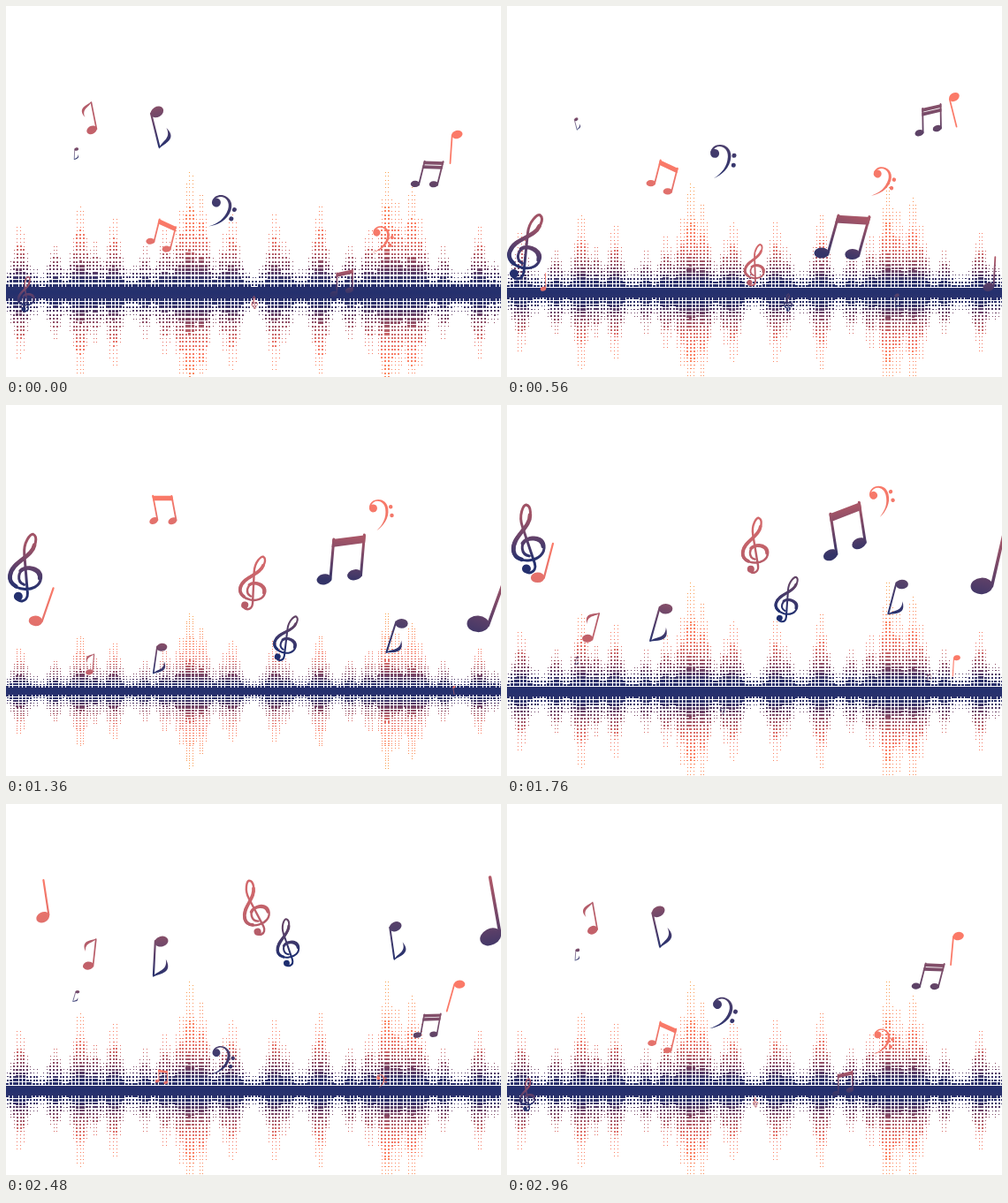
Write an HTML page with a canvas that moves like this. It is 560 by 420 pixels and loops after 3000 ms.

```html
<!DOCTYPE html>
<html lang="en">
<head>
<meta charset="utf-8">
<title>Music notes over a sound wave</title>
<style>
  html, body { margin: 0; width: 100%; height: 100%; overflow: hidden; background: #fff; }
  canvas { display: block; }
</style>
</head>
<body>
<canvas id="stage" width="560" height="420"></canvas>
<script>
const ctx = document.getElementById('stage').getContext('2d');
const LOOP = 3000, STEP = 40, MID = 324;
const NAVY = '#24306e', PLUM = '#704866', CORAL = '#fb7a68';

// ---- Sound wave: a dotted spectrum that pulses vertically ----
const PULSE = [1, 0.645, 0.9];
const COL = 3.75, ROW = 4.4;
const peaks = [
  [16, 76], [55, 56], [84, 99], [100, 60], [122, 86], [157, 52], [180, 71],
  [198, 92], [208, 138], [221, 112], [247, 66], [256, 89], [304, 91], [316, 58],
  [355, 99], [389, 55], [411, 71], [431, 138], [443, 102], [459, 119],
  [468, 85], [495, 54], [535, 74], [553, 36]
];

function random(seed) {
  const s = Math.sin(seed * 127.1 + 3.7) * 43758.5453;
  return s - Math.floor(s);
}

function columnHeight(x, i) {
  let h = 20 + 12 * random(i >> 1);
  for (const [px, ph] of peaks) {
    const d = Math.max(0, Math.abs(x - px) - 3);
    h = Math.max(h, ph * Math.exp(-d / 10));
  }
  return h;
}

const columns = Array.from({ length: 150 }, (_, i) => {
  const x = 1.5 + i * COL;
  return [x, columnHeight(x, i)];
});

const stops = [[0, NAVY], [14, '#2f336b'], [25, '#694267'], [38, '#a05668'],
  [54, '#e2726a'], [72, '#fb7f67'], [100, '#fb8d60'], [140, '#f8a74c']];

function waveFill(scale) {
  const reach = 140 * scale;
  const fill = ctx.createLinearGradient(0, MID - reach, 0, MID + reach);
  for (const [d, color] of stops) {
    fill.addColorStop(0.5 - d / 280, color);
    fill.addColorStop(0.5 + d / 280, color);
  }
  return fill;
}

// Dots sit on whole pixels and shrink toward the tip of their column.
function dot(x, y, w, h) {
  ctx.fillRect(Math.round(x - w / 2), Math.round(y - h / 2), w, h);
}

function drawWave(scale) {
  ctx.fillStyle = waveFill(scale);
  dot(280, MID, 560, Math.round(12.6 * scale));
  for (const [x, h] of columns) {
    for (let d = 8; d <= h; d += ROW) {
      const size = 0.7 + 2.8 * (1 - d / h);
      const w = Math.max(1, Math.round(size));
      const tall = Math.max(1, Math.round(size * scale));
      dot(x, MID - d * scale, w, tall);
      dot(x, MID + d * scale, w, tall);
    }
  }
}

// ---- Note shapes, drawn around their own centre ----
function blob(x, y, rx, ry = rx, turn = 0) {
  ctx.beginPath();
  ctx.ellipse(x, y, rx, ry, turn, 0, 7);
  ctx.fill();
}

function line(path, width) {
  ctx.lineWidth = width;
  ctx.stroke(new Path2D(path));
}

function fill(path) {
  ctx.fill(new Path2D(path));
}

function twin(rise, beams) {
  const left = -25 + rise / 2, right = -25 - rise / 2;
  line(`M-11 ${left}V${46 + left}M23 ${right}V${46 + right}`, 3);
  blob(-18, left + 46, 8.5, 6, -0.3);
  blob(16, right + 46, 8.5, 6, -0.3);
  const thick = beams > 1 ? 6.5 : 9;
  for (let i = 0; i < beams; i++) {
    const y = i * 8;
    fill(`M-12.5 ${left + y}L24.5 ${right + y}v${thick}L-12.5 ${left + y + thick}z`);
  }
}

const shapes = {
  quarter() {
    blob(-3, 17.5, 7.8, 5.8, -0.3);
    line('M4 16V-24', 2.2);
  },
  eighth() {
    blob(2, -17, 7.8, 5.8, -0.3);
    line('M-5 -17V22', 2.2);
    fill('M-6 24C-2 16 11 17 8 3C14 13 10 17 3 20Q-3 22 -6 24z');
  },
  twinUp() { twin(8, 1); },
  twinDown() { twin(-7, 1); },
  twinDouble() { twin(8, 2); },
  treble() {
    line('M-7 34C-6 42 7 40 5 29L-4 -14C-7 -28 0 -38 3 -38C9 -36 8 -24 1 -15' +
      'C-8 -6 -18 0 -18 12C-18 29 18 30 18 10C18 -4 -7 -4 -7 11C-7 16 -4 19 0 20', 3);
    line('M6 -26C5 -12 -17 -4 -17 12C-17 17 -14 21 -9 23', 4.6);
    line('M-6 5C0 -2 16 0 16.5 11', 4.2);
    blob(-5, 34, 5);
  },
  bass() {
    blob(-9.5, -9, 5);
    fill('M-14.5 -9C-14 -23 9 -23 9 -6C9 6 0 15 -9 19.5C0 13 5.500 5 5.500 -6C5.500 -18 -8 -21 -12 -12z');
    blob(12.5, -8, 2.5);
    blob(12.5, 3, 2.5);
  }
};

// shape, x, start y, end y, start time, size, base angle, top colour, bottom colour
const notes = [
  ['treble', 23, 353, 133, -685, 1, 2, '#a05366', NAVY],
  ['quarter', 42, 335, 95, -30, 1, 2, CORAL, '#e0706c'],
  ['eighth', 79, 330, 128, 870, 0.3, 0, '#85506a', NAVY],
  ['eighth', 96, 336, 112, 500, 0.78, 179, '#c5626a', '#b05b69'],
  ['eighth', 173, 335, 128, 400, 1, -1, '#8a5068', NAVY],
  ['twinDown', 176, 333, 104, 1845, 0.61, 0, CORAL, '#e0706c'],
  ['bass', 244, 355, 138, 1390, 1, 3, '#50406c', NAVY],
  ['treble', 281, 345, 116, -390, 0.81, 1, '#d2686b', '#b65d69'],
  ['treble', 318, 352, 140, 20, 0.69, 2, '#624366', '#1e2e70'],
  ['twinUp', 380, 340, 125, -690, 1, 0, '#a85667', '#343468'],
  ['bass', 425, 335, 107, 1885, 0.9, 2, CORAL, '#ec766b'],
  ['eighth', 441, 350, 138, 20, 0.92, 1, '#5c446a', NAVY],
  ['twinDouble', 477, 316, 87, 1400, 0.6, -2, '#85506a', '#5c4266'],
  ['quarter', 507, 333, 108, 950, 0.8, 179, CORAL, CORAL],
  ['quarter', 548, 331, 113, -130, 1.6, 3, '#b45a68', '#403768']
];

function drawNote([shape, x, from, to, start, size, angle, top, bottom], t) {
  const u = ((t - start + LOOP) % LOOP) / LOOP;
  const grow = Math.min(1, (u - 0.05) / 0.35);
  if (grow <= 0 || u > 0.965) return;
  const rise = (1 - Math.cos(Math.PI * u)) / 2;
  const swing = 17 * Math.cos(2 * Math.PI * (u - 0.48));
  const paint = ctx.createLinearGradient(0, -25, 0, 25);
  paint.addColorStop(0, top);
  paint.addColorStop(1, bottom);
  ctx.save();
  ctx.translate(x, from + (to - from) * rise);
  ctx.rotate((angle + swing) * Math.PI / 180);
  ctx.scale(size * grow, size * grow);
  ctx.fillStyle = ctx.strokeStyle = paint;
  ctx.lineCap = 'round';
  shapes[shape]();
  ctx.restore();
}

function draw() {
  // The motion advances in 40 ms steps; the small offset absorbs timer rounding.
  const tick = Math.floor((performance.now() + 4) / STEP);
  const t = tick * STEP % LOOP;
  ctx.fillStyle = '#fff';
  ctx.fillRect(0, 0, 560, 420);
  drawWave(PULSE[tick % PULSE.length]);
  for (const note of notes) drawNote(note, t);
  requestAnimationFrame(draw);
}
draw();
</script>
</body>
</html>
```
